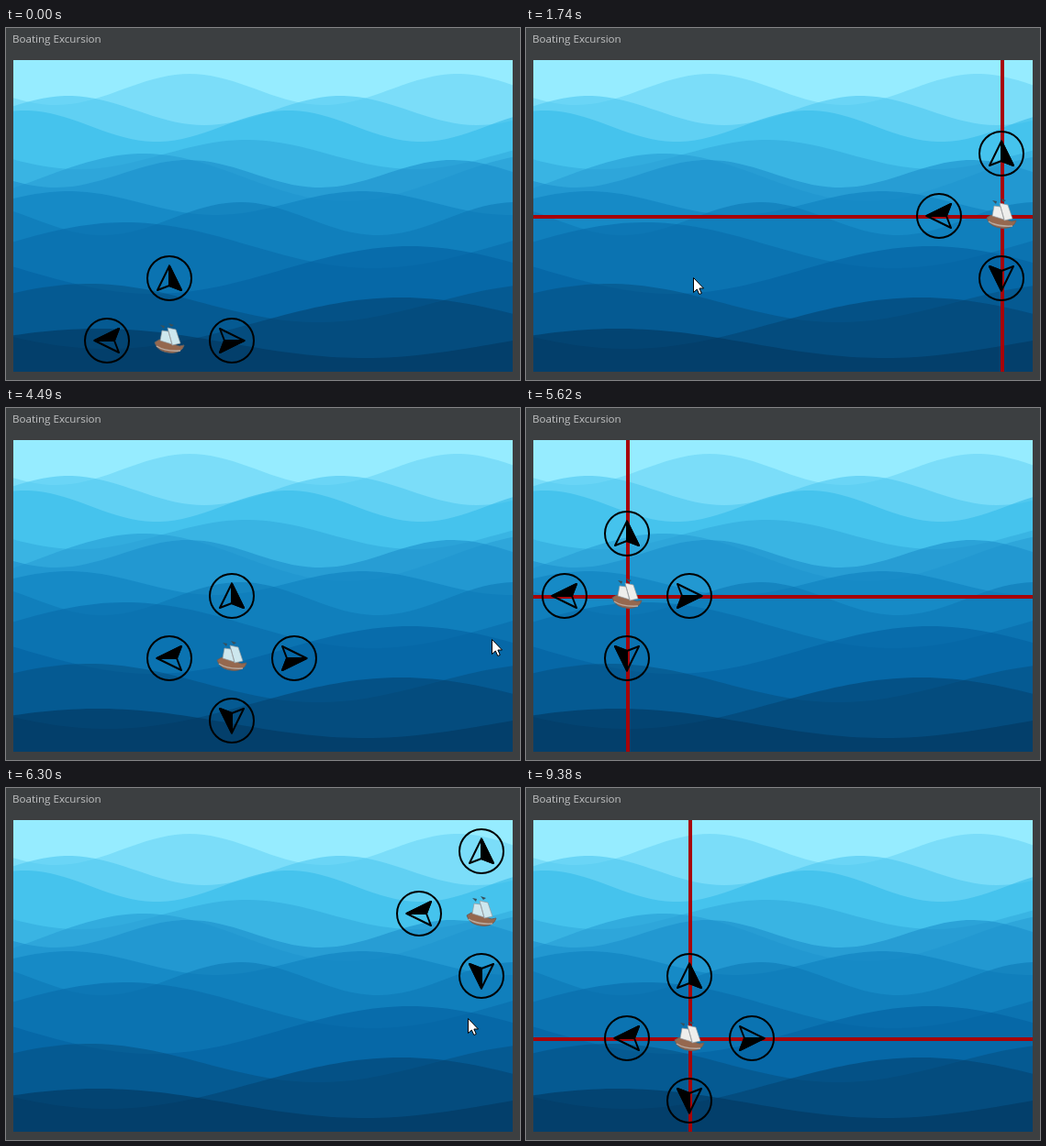
An HTML page that plays this animation: 560 px wide and 384 px high, repeating every 9640 ms.

```html
<!DOCTYPE html>
<html lang="en">
<head>
<meta charset="utf-8">
<title>Boating Excursion</title>
<style>
html, body { margin: 0; width: 100%; height: 100%; overflow: hidden; background: #3c3f41; }
svg { display: block; width: 560px; height: 384px; }
text { white-space: pre; }
.title { font: 11.6px "Open Sans", sans-serif; fill: #c2c3c4; }
.code { font: 13.3px "Noto Sans Mono", monospace; fill: #bcbec4; }
.head { font-style: italic; fill: #c080b4; }
.ui { font: 13.3px Inter, sans-serif; fill: #dfe1e5; }
.bold { font-weight: 600; }
</style>
</head>
<body>
<svg viewBox="0 0 560 384">
  <defs>
    <clipPath id="mapClip"><rect x="8" y="35" width="544" height="340"/></clipPath>
    <filter id="shadow" x="-20%" y="-20%" width="140%" height="150%">
      <feDropShadow dx="0" dy="8" stdDeviation="9" flood-opacity=".3"/>
    </filter>
    <g id="button" stroke="#000" stroke-width="2" stroke-linejoin="round">
      <circle r="24" fill="none"/>
      <path d="M0-13.500L-13 13L0 8L13 13Z" fill="none"/>
      <path d="M0-13.500V8L13 13Z"/>
    </g>
  </defs>

  <g id="sea">
    <rect width="560" height="384" fill="#3c3f41"/>
    <text class="title" x="7" y="16">Boating Excursion</text>
    <g clip-path="url(#mapClip)">
      <rect x="8" y="35" width="544" height="340" fill="#96ecff"/>
      <g id="waves"></g>
      <g stroke="#a70308" stroke-width="4">
        <path id="lineV" d="M1 35V375"/>
        <path id="lineH" d="M8 1H552"/>
      </g>
    </g>
    <g id="buttons"></g>
    <g id="ship">
      <path d="M-16 2L-11-1L11 6L16 5Q14 13 3 13.500Q-13 13-16 2Z" fill="#95684f" stroke="#68605d"/>
      <path d="M-14 6Q-5 12 12 11" fill="none" stroke="#b9aaa0" stroke-width="1.5"/>
      <path id="sails" d="M-8-11L-1-10L3 4L-10 0ZM-2-14L7-12L12 3L3 5Z" stroke="#969a9c" stroke-width=".7"/>
      <path d="M-10-17L-5-16L-6-13ZM-1-19L5-17L2-15Z" fill="#38505c"/>
    </g>
  </g>

  <g id="editor">
    <rect width="560" height="384" fill="#1e1f22"/>
    <g id="notes"></g>
    <g id="dialog">
      <rect x="345.500" y="99.500" width="330" height="186" rx="8" fill="#2b2d30" stroke="#484a4f" filter="url(#shadow)"/>
      <circle cx="379" cy="133" r="12" fill="#548af7"/>
      <text class="ui" x="379" y="139.500" text-anchor="middle" style="font-size:18px;fill:#fff">?</text>
      <text class="ui bold" x="405" y="133">Process 'MainKt' Is Running</text>
      <text class="ui" x="405" y="158.500">'MainKt' is not allowed to run in parallel.</text>
      <text class="ui" x="405" y="175">Would you like to stop the running one?</text>
      <rect x="405.500" y="195.500" width="15" height="15" rx="2.500" fill="none" stroke="#6f737a"/>
      <text class="ui" x="429" y="208">Do not show this dialog again</text>
      <rect x="463" y="237" width="130" height="30" rx="5" fill="none" stroke="#3574f0" stroke-width="2"/>
      <rect x="465.500" y="239.500" width="125" height="25" rx="3" fill="#3574f0"/>
      <text class="ui bold" x="482" y="257" style="fill:#fff">Stop and Rerun</text>
    </g>
  </g>

  <path id="pointer" d="M.5.500V16.500L4.300 13L6.800 18.500L9.300 17.400L6.900 12H11.500Z" fill="#fff" stroke="#000"/>
</svg>
<script>
const $ = id => document.getElementById(id);
const LOOP = 9640, CELL = 68, COLS = 8, ROWS = 5, REPEAT = 65;
const cellX = col => 42 + CELL * col;
const cellY = row => 69 + CELL * row;

function add(parent, tag, attrs, text) {
  const el = document.createElementNS('http://www.w3.org/2000/svg', tag);
  for (const name in attrs) el.setAttribute(name, attrs[name]);
  if (text) el.textContent = text;
  return parent.appendChild(el);
}
const show = (el, on) => el.setAttribute('display', on ? 'inline' : 'none');
const place = (el, x, y, turn = 0) =>
  el.setAttribute('transform', `translate(${x} ${y}) rotate(${turn})`);
const lerp = (a, b, k) => a + (b - a) * k;

// Sine waves from back to front: crest x, middle y, height, length.
const waves = [
  [200, 67, 17, 292], [68, 90, 16, 297], [20, 107, 17, 288], [262, 138, 16, 365],
  [150, 163, 26, 440], [198, 159, 15, 288], [68, 191, 13, 320], [255, 208, 18, 300],
  [130, 237, 25, 540], [440, 264, 26, 560], [90, 300, 21, 500], [430, 322, 28, 640],
  [100, 344, 16, 580]
];
function wavePath([crest, middle, height, length]) {
  let d = 'M0 400';
  for (let x = 0; x <= 560; x += 8)
    d += `L${x} ${(middle - height * Math.cos((x - crest) / length * 2 * Math.PI)).toFixed(1)}`;
  return d + 'V400Z';
}

// Water colour by depth, blended between a few stops.
const stops = { 0: [150, 236, 255], 3: [70, 195, 238], 7: [23, 139, 199], 10: [7, 105, 168], 13: [4, 64, 107] };
function waterColor(depth) {
  const keys = Object.keys(stops).map(Number);
  const high = keys.find(k => k >= depth), low = keys.findLast(k => k <= depth);
  const k = (depth - low) / (high - low || 1);
  return stops[low].map((c, i) => lerp(c, stops[high][i], k));
}

// Translucent fills whose full stack adds up to the water colour.
const ALPHA = .62;
waves.forEach((wave, i) => {
  const above = waterColor(i), below = waterColor(i + 1);
  const fill = above.map((c, j) => Math.max(0, Math.round(c + (below[j] - c) / ALPHA)));
  add($('waves'), 'path', { d: wavePath(wave), fill: `rgb(${fill})`, 'fill-opacity': ALPHA });
});

const directions = { U: [0, -1], R: [1, 0], D: [0, 1], L: [-1, 0] };
const buttons = Object.values(directions).map(([dx, dy], i) => ({
  dx, dy, turn: i * 90, el: add($('buttons'), 'use', { href: '#button' })
}));

// One entry per text line, 22px apart; a leading # marks a heading.
const notes = `#st

t is limited by the size of the map. Appropriate Button(s) are hidden to

#To Use

ions.

#est Result

t should not exceed the boundaries of the map.



#sure Placement

ment is random with each run of the program.`;
notes.split('\n').forEach((line, i) => {
  const head = line.startsWith('#');
  add($('notes'), 'text', { x: head ? -2 : -1, y: 12.5 + i * 22, class: head ? 'code head' : 'code' },
    line.replace('#', ''));
});

// Each game: start time and cell, keys by time, treasure and when its lines show.
const games = [
  { from: 0, until: 3400, start: [2, 4], treasure: [7, 2], colAt: 200, rowAt: 530,
    keys: { 70: 'RRRRRLLLLLLLUUU', 670: 'D', 1070: 'R', 1610: 'RRRRRR' } },
  { from: 4490, until: 5830, start: [3, 3], treasure: [1, 2], colAt: 5020, rowAt: 5220,
    keys: { 4830: 'L', 5020: 'L', 5220: 'U' } },
  { from: 6300, until: LOOP, start: [7, 1], treasure: [2, 3], colAt: 7250, rowAt: 6570,
    keys: { 6570: 'DDLLLLLL', 7250: 'U', 7440: 'DD', 7850: 'R', 8110: 'U' } }
];

// Held keys move the ship two cells per repeat.
function shipCell({ start, keys }, t) {
  let [col, row] = start;
  for (const time in keys) {
    if (t < time) break;
    const moved = 2 * (1 + Math.floor((t - time) / REPEAT));
    for (const key of keys[time].slice(0, moved)) {
      col += directions[key][0];
      row += directions[key][1];
    }
  }
  return [col, row];
}

// Pointer visits: key points [time, x, y], joined by straight glides, until it leaves.
const visits = [
  { until: 3400, path: [[1740, 182, 272], [2270, 182, 272], [2400, 227, 246]] },
  { until: 3820, path: [[3750, 398, 279]] },
  { until: 5620, path: [[3960, 550, 279], [4160, 536, 232], [4290, 529, 252]] },
  { until: 9380, path: [[5900, 540, 270], [6110, 503, 251], [8800, 503, 251], [9000, 545, 89], [9380, 548, 384]] }
];
function pointerAt(t) {
  const visit = visits.find(v => t >= v.path[0][0] && t < v.until);
  if (!visit) return null;
  const i = visit.path.findLastIndex(p => p[0] <= t);
  const a = visit.path[i], b = visit.path[i + 1] || a;
  const k = (t - a[0]) / (b[0] - a[0] || 1);
  return [lerp(a[1], b[1], k), lerp(a[2], b[2], k)];
}

function drawGame(game, t) {
  const [col, row] = shipCell(game, t);
  place($('ship'), cellX(col), cellY(row));
  for (const { dx, dy, turn, el } of buttons) {
    const c = col + dx, r = row + dy;
    show(el, c >= 0 && c < COLS && r >= 0 && r < ROWS);
    place(el, cellX(c), cellY(r), turn);
  }
  const hasCol = t >= game.colAt, hasRow = t >= game.rowAt;
  show($('lineV'), hasCol);
  show($('lineH'), hasRow);
  place($('lineV'), cellX(game.treasure[0]), 0);
  place($('lineH'), 0, cellY(game.treasure[1]));
  $('sails').setAttribute('fill', hasCol || hasRow ? '#eeeeec' : '#cde7ee');
}

function draw(t) {
  const game = games.find(g => t >= g.from && t < g.until);
  show($('sea'), game);
  show($('editor'), !game);
  if (game) {
    drawGame(game, t);
  } else {
    // The dialog opens just after the editor appears and closes just before it goes.
    const last = games.findLast(g => g.until <= t), next = games.find(g => g.from > t);
    show($('dialog'), t >= last.until + 80 && t < next.from - 60);
  }
  const spot = pointerAt(t);
  show($('pointer'), spot);
  if (spot) place($('pointer'), Math.round(spot[0]), Math.round(spot[1]));
}

const start = performance.now();
function tick() {
  draw((performance.now() - start) % LOOP);
  requestAnimationFrame(tick);
}
tick();
</script>
</body>
</html>
```
